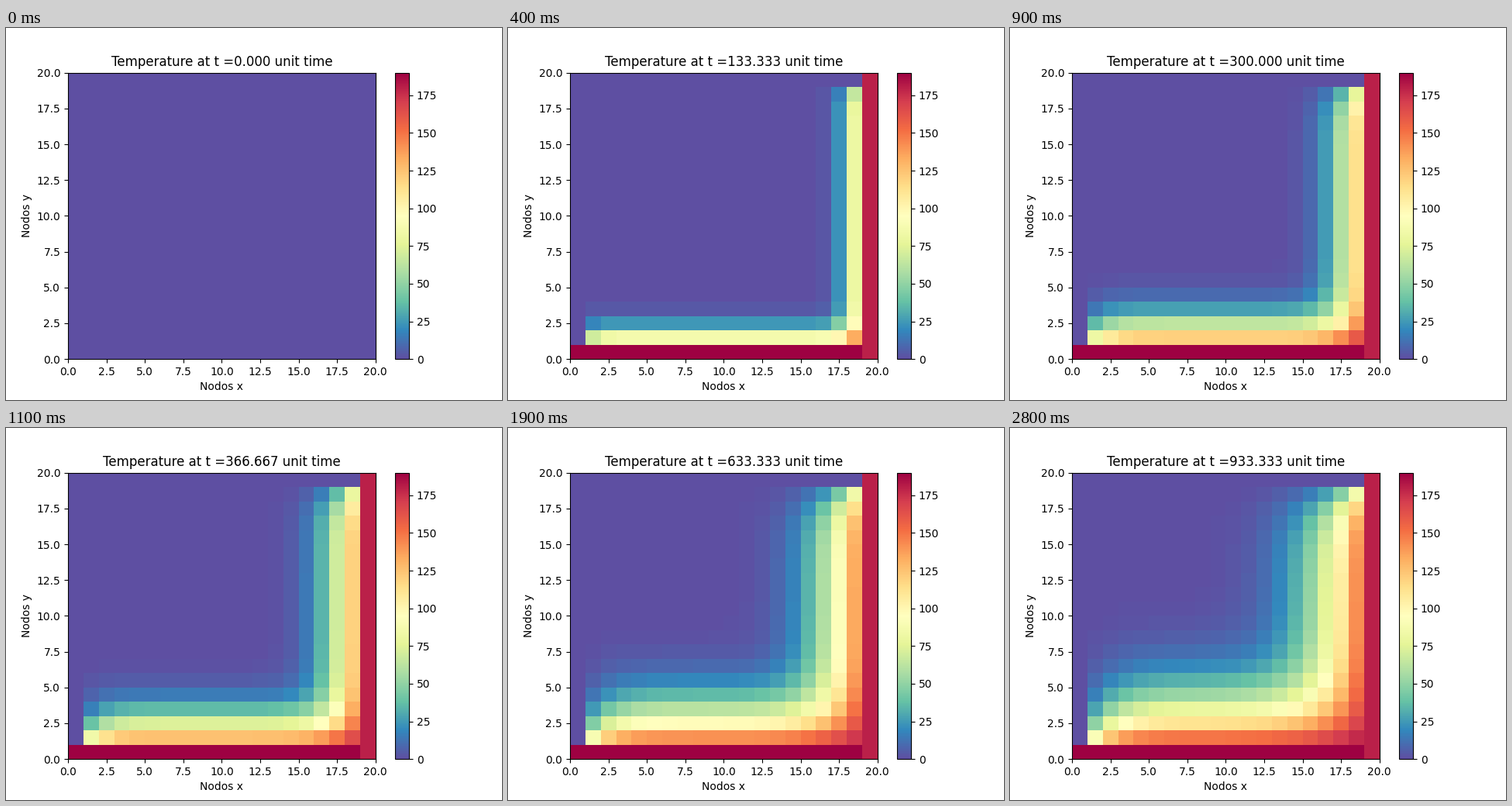
A matplotlib script for the animation above (2900 ms loop, 640 px wide and 480 px high).

```python
import numpy as np
import matplotlib.pyplot as plt
from matplotlib.animation import FuncAnimation

NODES = 20
FRAMES = 29
DT = 100 / 3
GAMMA = 0.25          # alpha * dt / dx**2
T_BOTTOM, T_RIGHT = 190, 180


def step(u):
    """Advance one explicit heat step, then apply the fixed edges."""
    new = np.zeros_like(u)
    mid = u[1:-1, 1:-1]
    around = u[2:, 1:-1] + u[:-2, 1:-1] + u[1:-1, 2:] + u[1:-1, :-2]
    new[1:-1, 1:-1] = mid + GAMMA * (around - 4 * mid)
    new[0, :] = T_BOTTOM
    new[:, -1] = T_RIGHT
    return new


fields = [np.zeros((NODES, NODES))]
while len(fields) < FRAMES:
    fields.append(step(fields[-1]))

fig, ax = plt.subplots(figsize=(6.4, 4.8), dpi=100)
mesh = ax.pcolormesh(fields[0], cmap="Spectral_r", vmin=0, vmax=T_BOTTOM)
fig.colorbar(mesh, ax=ax)
ax.set_xlabel("Nodos x")
ax.set_ylabel("Nodos y")
title = ax.set_title("")


def draw(k):
    mesh.set_array(fields[k])
    title.set_text(f"Temperature at t ={k * DT:.3f} unit time")
    return mesh, title


anim = FuncAnimation(fig, draw, frames=FRAMES, interval=100, repeat=True)
plt.show()
```
